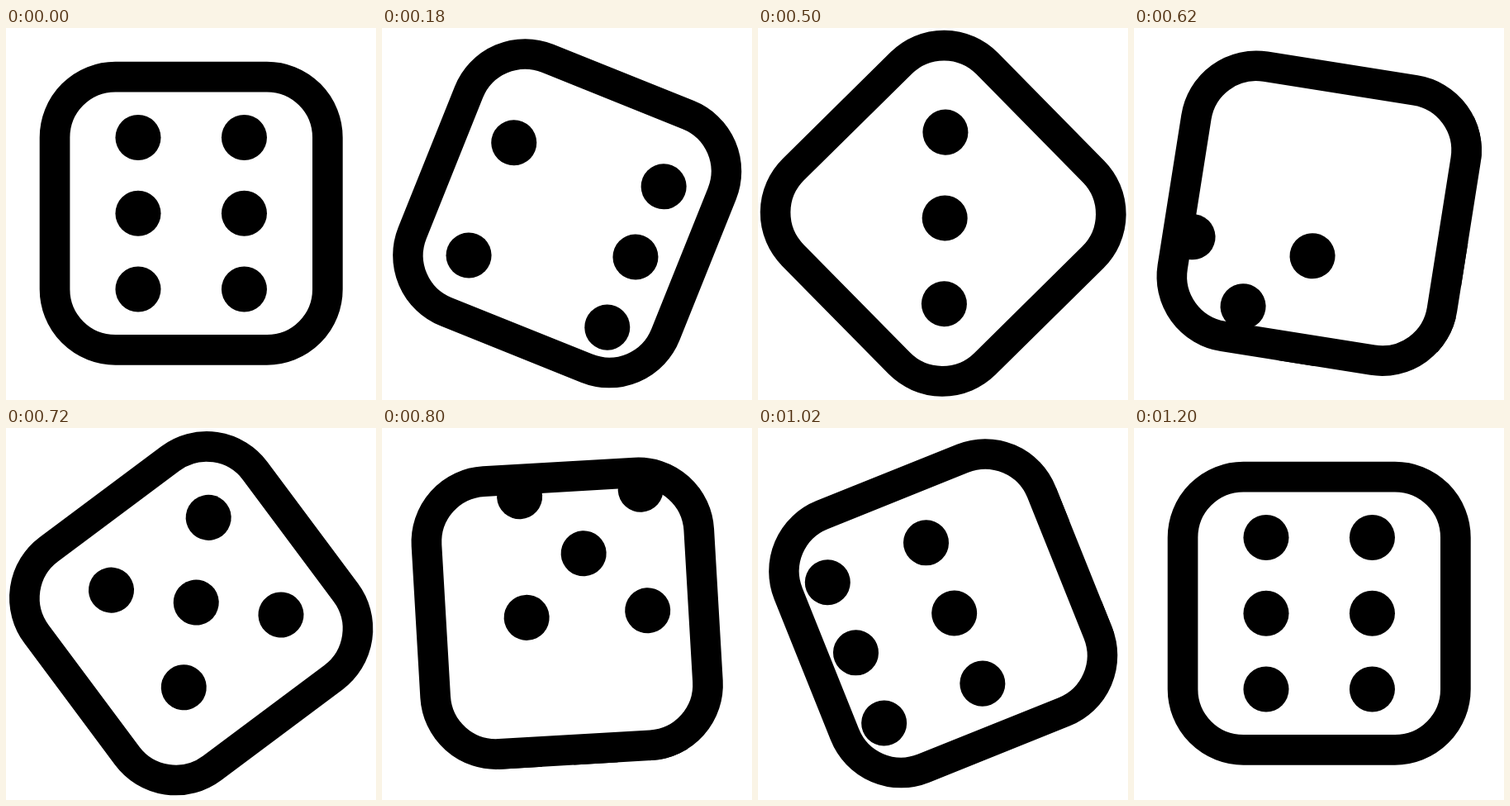
An HTML page with a canvas that plays this animation: 448x450 px, repeating every 1220 ms.

```html
<!DOCTYPE html>
<html lang="en">
<head>
<meta charset="utf-8">
<title>Rolling die</title>
<style>
  html, body { margin: 0; width: 100%; height: 100%; overflow: hidden; background: #fff; }
  canvas { display: block; }
</style>
</head>
<body>
<canvas id="stage" width="448" height="450"></canvas>
<script>
const ctx = document.getElementById('stage').getContext('2d');
const LOOP = 1220, ROLL = 1200, STEP = 20;
const UNIT = 18.35, CENTER = 224.2, GAP = 17.75;

// Faces lie flat around the six; the die is a rotating window over them.
const corners = [[-4, -4], [4, -4], [-4, 4], [4, 4]];
const faces = [
  { x: 0, y: 0, dots: [-5, 0, 5].flatMap(y => [[-3.5, y], [3.5, y]]) },
  { x: -GAP, y: 0, dots: corners },
  { x: 0, y: 17.45, dots: [[-4, 4], [0, 0], [4, -4]] },
  { x: GAP, y: 0, dots: [...corners, [0, 0]] }
];

// Offsets that bring six, four, three, five and six into view.
const stops = [[0, 0], [GAP, 0], [0, -GAP], [-GAP, 0], [0, 0]];

// Time in ms against progress along the stops.
const pace = [[0, 0], [180, 0.45], [340, 1.272], [500, 1.992], [720, 3.095], [880, 3.51], [1200, 4]];

function hermite(a, b, ma, mb, u) {
  const u2 = u * u, u3 = u2 * u;
  return a * (2 * u3 - 3 * u2 + 1) + ma * (u3 - 2 * u2 + u) +
         b * (3 * u2 - 2 * u3) + mb * (u3 - u2);
}

function paceSlope(i) {
  if (i === 0 || i === pace.length - 1) return 0;
  const [[t0, s0], [t1, s1], [t2, s2]] = pace.slice(i - 1, i + 2);
  const before = t1 - t0, after = t2 - t1;
  return ((s1 - s0) / before * after + (s2 - s1) / after * before) / (before + after);
}

function progressAt(t) {
  let i = 0;
  while (i < pace.length - 2 && t >= pace[i + 1][0]) i++;
  const [t0, s0] = pace[i], [t1, s1] = pace[i + 1], span = t1 - t0;
  return hermite(s0, s1, paceSlope(i) * span, paceSlope(i + 1) * span, (t - t0) / span);
}

function offsetAt(s) {
  const last = stops.length - 1;
  const i = Math.min(Math.floor(s), last - 1);
  const stop = k => stops[Math.max(0, Math.min(last, k))];
  return [0, 1].map(axis => {
    const [p, a, b, n] = [-1, 0, 1, 2].map(k => stop(i + k)[axis]);
    return hermite(a, b, (b - p) / 2, (n - a) / 2, s - i);
  });
}

function box(half, radius) {
  ctx.beginPath();
  ctx.roundRect(-half, -half, half * 2, half * 2, radius);
}

function draw(time) {
  const t = Math.min(time, ROLL), p = t / ROLL;
  const [dx, dy] = offsetAt(progressAt(t));

  ctx.fillStyle = '#fff';
  ctx.fillRect(0, 0, 448, 450);
  ctx.save();
  ctx.translate(CENTER, CENTER);
  ctx.rotate(2 * Math.PI * p * p * (3 - 2 * p));
  ctx.scale(UNIT, UNIT);

  ctx.lineWidth = 2;
  ctx.strokeStyle = ctx.fillStyle = '#000';
  box(9, 4);
  ctx.stroke();

  box(10, 5);
  ctx.clip();
  for (const face of faces) {
    for (const [x, y] of face.dots) {
      ctx.beginPath();
      ctx.arc(face.x + x + dx, face.y + y + dy, 1.5, 0, 2 * Math.PI);
      ctx.fill();
    }
  }
  ctx.restore();
}

const start = performance.now();
function tick() {
  const time = (performance.now() - start) % LOOP;
  draw(Math.floor(time / STEP) * STEP);
  requestAnimationFrame(tick);
}
tick();
</script>
</body>
</html>
```
